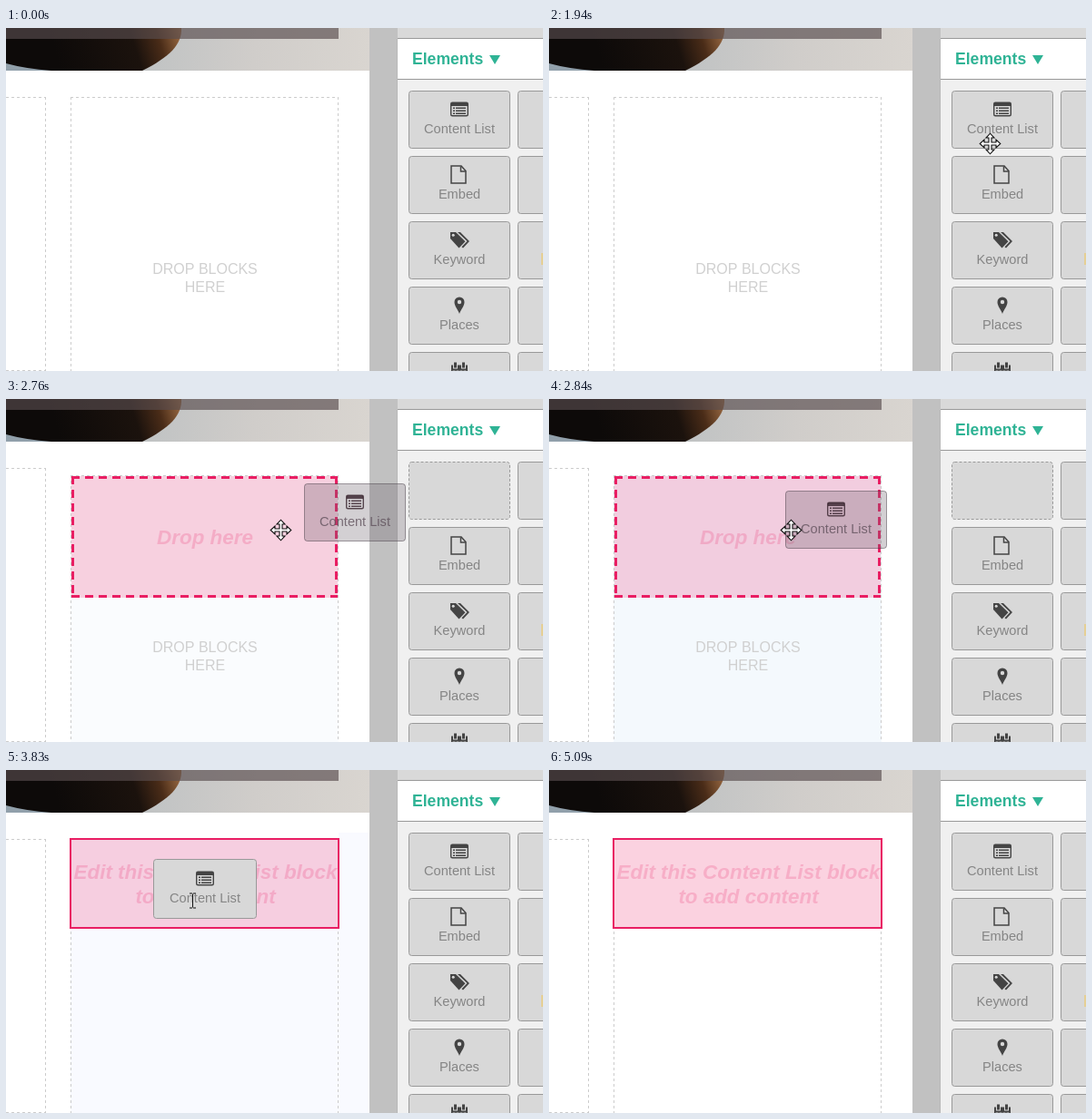
Write an HTML page with a canvas that moves like this. It is 591 by 378 pixels and loops after 5.83 s.

```html
<!DOCTYPE html>
<html lang="en">
<head>
<meta charset="utf-8">
<title>Drag a block</title>
<style>
  html, body { margin: 0; width: 100%; height: 100%; overflow: hidden; background: #fff; }
  canvas { display: block; }
</style>
</head>
<body>
<canvas id="stage" width="591" height="378"></canvas>
<script>
const ctx = document.getElementById('stage').getContext('2d');
const LOOP = 5830;
const SANS = '"Liberation Sans", Arial, sans-serif';
const INK = '#444';
const PINK = '#e91e63';
const PINK_TINT = 'rgba(233,30,99,.2)';

// Pointer steps: time, x, y, shape
const pointer = [
  [0, 0, 0, ''],
  [1490, 491, 331, 'move'], [1590, 491, 305, 'move'], [1680, 490, 260, 'move'],
  [1770, 488, 208, 'move'], [1850, 487, 162, 'move'], [1940, 485, 127, 'move'],
  [2030, 484, 112, 'move'],
  [2580, 440, 120, 'move'], [2670, 370, 136, 'move'], [2760, 302, 144, 'move'],
  [2840, 266, 144, 'move'], [2930, 223, 144, 'move'], [3020, 203, 144, 'move'],
  [3100, 203, 142, 'move'],
  [3740, 205, 143, 'text'], [4010, 208, 154, 'move'],
  [4640, 226, 164, 'move'], [4730, 298, 203, 'move'], [4820, 398, 252, 'move'],
  [4910, 490, 294, 'move'], [5000, 540, 316, 'move'], [5090, 0, 0, '']
];
const DRAG = 2580, OVER = 2760, DROP = 3740, SETTLED = 3920, FADED = 4280;

function rect(x, y, w, h, color) {
  ctx.fillStyle = color;
  ctx.fillRect(x, y, w, h);
}

function text(str, x, y, font, color, align = 'center') {
  ctx.font = `${font} ${SANS}`;
  ctx.fillStyle = color;
  ctx.textAlign = align;
  ctx.fillText(str, x, y);
}

function shape(points, fill, stroke, width = 1) {
  ctx.beginPath();
  points.forEach(([x, y]) => ctx.lineTo(x, y));
  ctx.closePath();
  if (fill) { ctx.fillStyle = fill; ctx.fill(); }
  if (stroke) { ctx.strokeStyle = stroke; ctx.lineWidth = width; ctx.stroke(); }
}

function dashedLine(x1, y1, x2, y2, color = '#ccc', width = 1, dash = [3, 3]) {
  ctx.save();
  ctx.setLineDash(dash);
  ctx.strokeStyle = color;
  ctx.lineWidth = width;
  ctx.beginPath();
  ctx.moveTo(x1, y1);
  ctx.lineTo(x2, y2);
  ctx.stroke();
  ctx.restore();
}

function card(x, y, w, h, fill, stroke, dash = []) {
  ctx.save();
  ctx.beginPath();
  ctx.roundRect(x + .5, y + .5, w - 1, h - 1, 3);
  ctx.fillStyle = fill;
  ctx.fill();
  ctx.setLineDash(dash);
  ctx.strokeStyle = stroke;
  ctx.lineWidth = 1;
  ctx.stroke();
  ctx.restore();
}

// Icons are centred on the origin.
const icons = {
  list(color) {
    ctx.strokeStyle = color;
    ctx.lineWidth = 1.4;
    ctx.beginPath();
    ctx.roundRect(-9.3, -7.3, 18.6, 14.6, 1.5);
    ctx.stroke();
    rect(-9, -7, 18, 3.5, color);
    for (const y of [-2, 1, 4]) {
      rect(-7, y, 2, 1.5, color);
      rect(-4, y, 11, 1.5, color);
    }
  },
  file(color) {
    shape([[-9, -9.5], [2, -9.5], [7, -4], [7, 9.5], [-9, 9.5]], null, color, 1.5);
    ctx.beginPath();
    ctx.moveTo(1.5, -9); ctx.lineTo(1.5, -3.5); ctx.lineTo(7, -3.5);
    ctx.stroke();
  },
  tags(color) {
    shape([[-2, -8.5], [1, -8.5], [11, 1.5], [4, 9], [2.5, 7.7], [8.5, 1.5]], color);
    shape([[-10, -8.5], [-4, -8.5], [6.5, 1.8], [-.5, 9], [-10, -1.5]], color);
    ctx.fillStyle = '#d8d8d8';
    ctx.beginPath();
    ctx.arc(-6.8, -5.3, 1.5, 0, 7);
    ctx.fill();
  },
  pin(color) {
    ctx.fillStyle = color;
    ctx.beginPath();
    ctx.moveTo(0, 9.5);
    ctx.bezierCurveTo(-1.5, 5, -5.5, 1, -5.5, -3.5);
    ctx.arc(0, -3.5, 5.5, Math.PI, 0);
    ctx.bezierCurveTo(5.5, 1, 1.5, 5, 0, 9.5);
    ctx.arc(0, -3.5, 2.2, 0, Math.PI * 2, true);
    ctx.fill();
  },
  calendar(color) {
    rect(-9, -6, 18, 16, color);
    for (const x of [-6, 3]) {
      rect(x - 1, -7, 5, 5, '#d8d8d8');
      rect(x, -9, 3, 6, color);
    }
    for (let i = 0; i < 4; i++) rect(-7.5 + i * 4, 0, 3, 3, '#d8d8d8');
  }
};

function blockFace(x, y, icon, label, iconColor = INK, labelColor = '#858585') {
  ctx.save();
  ctx.translate(x + 56, y + 20.5);
  icons[icon](iconColor);
  ctx.restore();
  text(label, x + 56, y + 47, '14.6px', labelColor);
}

function drawPhoto() {
  ctx.save();
  ctx.beginPath();
  ctx.rect(0, 0, 400, 47);
  ctx.clip();
  const sky = ctx.createLinearGradient(150, 0, 400, 30);
  sky.addColorStop(0, '#bfc2c3');
  sky.addColorStop(.5, '#d0cdca');
  sky.addColorStop(1, '#d9d5d0');
  rect(0, 0, 400, 47, sky);
  rect(0, 36, 60, 11, '#91a0ab');

  const fur = ctx.createLinearGradient(60, 45, 192, 5);
  fur.addColorStop(0, '#0d0a09');
  fur.addColorStop(.62, '#1b120d');
  fur.addColorStop(.82, '#4a2c18');
  fur.addColorStop(1, '#9a6a42');
  ctx.fillStyle = fur;
  ctx.beginPath();
  ctx.moveTo(0, 0);
  ctx.lineTo(193, 0);
  ctx.bezierCurveTo(194, 18, 180, 32, 150, 47);
  ctx.lineTo(50, 47);
  ctx.quadraticCurveTo(22, 45, 0, 39);
  ctx.fill();
  rect(0, 0, 366, 12, 'rgba(88,76,78,.66)');
  ctx.restore();
}

function drawPanel(dragging) {
  rect(400, 0, 31, 378, '#c1c1c1');
  rect(431, 0, 160, 378, '#f0f0f0');
  rect(431, 0, 160, 11, '#d9d9d9');
  rect(431, 11, 160, 46, '#999');
  rect(431, 12, 160, 44, '#fff');
  rect(430, 12, 1, 366, '#b8b8b8');
  text('Elements', 447, 40, 'bold 17.6px', '#2fb395', 'left');
  shape([[532, 30], [544, 30], [538, 40]], '#2fb395');

  const blocks = [['list', 'Content List'], ['file', 'Embed'], ['tags', 'Keyword'],
                  ['pin', 'Places'], ['calendar', '']];
  blocks.forEach(([icon, label], i) => {
    const y = 69 + i * 72;
    const empty = dragging && i === 0;
    card(443, y, 112, 64, '#d8d8d8', '#999', empty ? [3, 2] : []);
    card(563, y, 112, 64, '#d8d8d8', '#999');
    if (!empty) blockFace(443, y, icon, label);
  });
  rect(589, 248, 2, 13, '#e5cf94');
}

function paneTint(t) {
  if (t < OVER || t >= FADED) return 0;
  if (t < DROP) return Math.min(1, (t - 2670) / 340);
  if (t < 3830) return .65;
  return .35 * (FADED - t) / (FADED - 3830);
}

function drawPane(t) {
  const over = t >= OVER && t < DROP;
  const dropped = t >= DROP;
  const top = over ? 84 : 76;
  const tint = paneTint(t);

  dashedLine(0, 76.5, 44, 76.5);
  dashedLine(43.5, 76, 43.5, 378);
  dashedLine(0, 377.5, 44, 377.5);

  if (tint) {
    const color = dropped ? `rgba(238,241,255,${tint})` : `rgba(234,244,252,${tint})`;
    rect(71, top, 295, 378 - top, color);
    if (dropped) rect(366, 69, 34, 309, color);
  }
  dashedLine(71, top + .5, 366, top + .5);
  dashedLine(71.5, top, 71.5, 378);
  dashedLine(365.5, top, 365.5, 378);

  if (!dropped) {
    text('DROP BLOCKS', 219, top + 195, '16px', '#d0d0d0');
    text('HERE', 219, top + 215, '16px', '#d0d0d0');
  }
  if (over) {
    rect(72, 85, 293, 134, PINK_TINT);
    for (const y of [86.5, 217.5]) dashedLine(72, y, 365, y, PINK, 3, [9, 6]);
    for (const x of [73.5, 363.5]) dashedLine(x, 85, x, 219, PINK, 3, [9, 6]);
    text('Drop here', 219, 160, 'italic bold 22.4px', PINK_TINT);
  }
  if (dropped) {
    rect(70, 75, 297, 100, PINK_TINT);
    ctx.strokeStyle = PINK;
    ctx.lineWidth = 2;
    ctx.strokeRect(71, 76, 295, 98);
    text('Edit this Content List block', 219.5, 120, 'italic bold 22.4px', PINK_TINT);
    text('to add content', 219.5, 147, 'italic bold 22.4px', PINK_TINT);
  }
}

function drawDragged(t, step) {
  if (t >= DRAG && t < DROP) {
    // The block trails the pointer by one step.
    const [, px, py] = pointer[step - 1];
    const x = px - 42, y = py - 43;
    card(x, y, 112, 64, 'rgba(110,100,110,.3)', 'rgba(70,60,70,.5)');
    blockFace(x, y, 'list', 'Content List', 'rgba(55,35,45,.8)', 'rgba(90,75,85,.75)');
  } else if (t >= DROP && t < SETTLED) {
    card(162, 98, 114, 66, '#d8d8d8', '#999');
    blockFace(163, 99, 'list', 'Content List');
  }
}

function drawPointer([, x, y, kind]) {
  if (!kind) return;
  ctx.save();
  ctx.translate(x + .5, y + .5);
  if (kind === 'move') {
    const arm = [[-1.5, -1.5], [-1.5, -6.5], [-4.5, -6.5], [0, -11.3],
                 [4.5, -6.5], [1.5, -6.5]];
    const points = [];
    for (let i = 0; i < 4; i++) {
      const c = [1, 0, -1, 0][i], s = [0, 1, 0, -1][i];
      arm.forEach(([ax, ay]) => points.push([ax * c - ay * s, ax * s + ay * c]));
    }
    shape(points, '#fff', '#111', 1.1);
  } else {
    rect(-.5, -7, 1, 15, '#111');
    for (const py of [-8, 8]) {
      rect(-3.5, py, 3, 1, '#111');
      rect(.5, py, 3, 1, '#111');
    }
  }
  ctx.restore();
}

function draw(t) {
  const step = pointer.findLastIndex(([at]) => at <= t);
  rect(0, 0, 591, 378, '#fff');
  drawPhoto();
  drawPane(t);
  drawPanel(t >= DRAG && t < DROP);
  drawDragged(t, step);
  drawPointer(pointer[step]);
}

let start;
function tick(now) {
  start ??= now;
  draw((now - start) % LOOP);
  requestAnimationFrame(tick);
}
draw(0);
requestAnimationFrame(tick);
</script>
</body>
</html>
```
